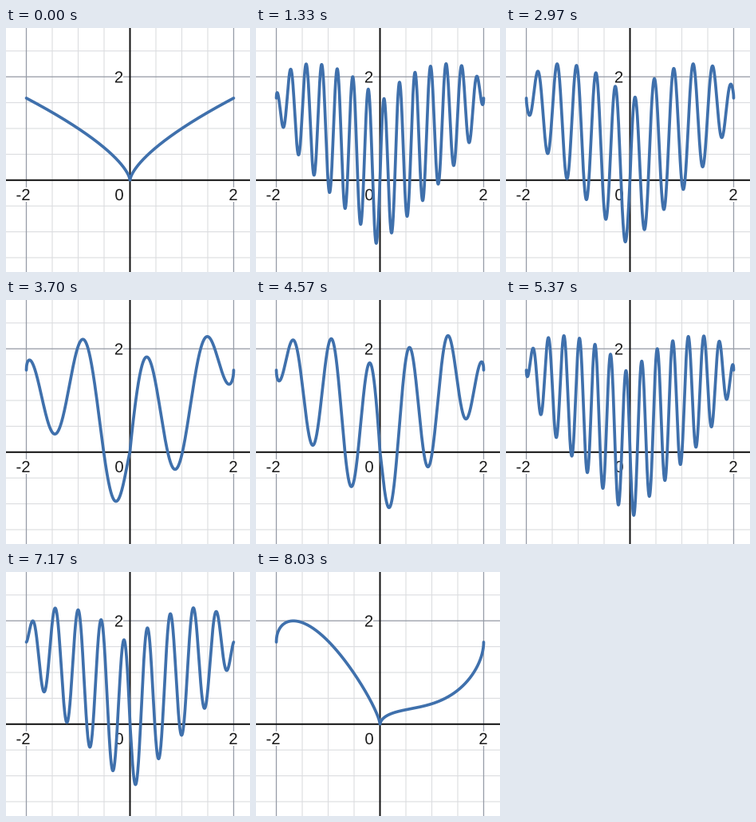
Recreate the animation shown at these times as a matplotlib script. Size 306 by 306 pixels, loop 8060 ms.

```python
import numpy as np
import matplotlib.pyplot as plt
import matplotlib.patheffects as pe
from matplotlib.animation import FuncAnimation

SIZE, DPI = 306, 100
LOOP_MS, TICK_MS = 8060, 20
STEPS = 242                # curve changes per loop, 30 per second
X0, Y0 = 155.5, 190.8      # origin in pixels
UX, UY = 65, 64.8          # pixels per unit
PT = 72 / DPI              # points per pixel

BLUE = "#3f70ac"
MINOR, MAJOR, AXIS = "#dcdde0", "#989da8", "#101010"

plt.rcParams["font.family"] = "Liberation Sans"

fig = plt.figure(figsize=(SIZE / DPI, SIZE / DPI), dpi=DPI, facecolor="white")
ax = fig.add_axes([0, 0, 1, 1])
ax.set_xlim(0, SIZE)
ax.set_ylim(SIZE, 0)
ax.axis("off")


def px(x):
    return X0 + UX * x


def py(y):
    return Y0 - UY * y


def rule(value, color, width, z):
    style = dict(color=color, lw=width * PT, zorder=z, snap=False)
    if 0 <= px(value) <= SIZE:
        ax.axvline(px(value), **style)
    if 0 <= py(value) <= SIZE:
        ax.axhline(py(value), **style)


def label(x, y, text):
    t = ax.text(x, y, text, size=20.3 * PT, color="#1c1c1c", ha="center",
                va="center_baseline", zorder=4)
    t.set_path_effects([pe.withStroke(linewidth=4 * PT, foreground="white")])


for i in range(-6, 7):
    if i == 0:
        rule(0, AXIS, 2, 3)
    elif i % 4 == 0:
        rule(i / 2, MAJOR, 1.3, 2)
    else:
        rule(i / 2, MINOR, 1.1, 1)

label(21.5, 208.5, "-2")
label(142, 208.5, "0")
label(285, 208.5, "2")
label(141.5, 61, "2")

x = np.linspace(-2, 2, 2001)
cusp = np.abs(x) ** (2 / 3)
envelope = 0.7 * np.sqrt(np.maximum(4 - x * x, 0))
curve, = ax.plot([], [], color=BLUE, lw=3.7 * PT, zorder=5,
                 solid_capstyle="round", solid_joinstyle="round")


def frequency(n):
    """Triangle wave: 0, up to 10 pi, down to -10 pi and back."""
    half = STEPS // 2
    sign = 1 if n < half else -1
    m = n % half
    return sign * np.pi / 6 * min(m, half - m)


def update(tick):
    t = tick * TICK_MS + TICK_MS // 2
    n = (3 * t + 10) // 100    # 30 steps per second on a 10 ms clock
    y = cusp + envelope * np.sin(frequency(n) * x)
    curve.set_data(px(x), py(y))
    return curve,


anim = FuncAnimation(fig, update, frames=LOOP_MS // TICK_MS, interval=TICK_MS,
                     repeat=True, repeat_delay=0, blit=False)
plt.show()
```
